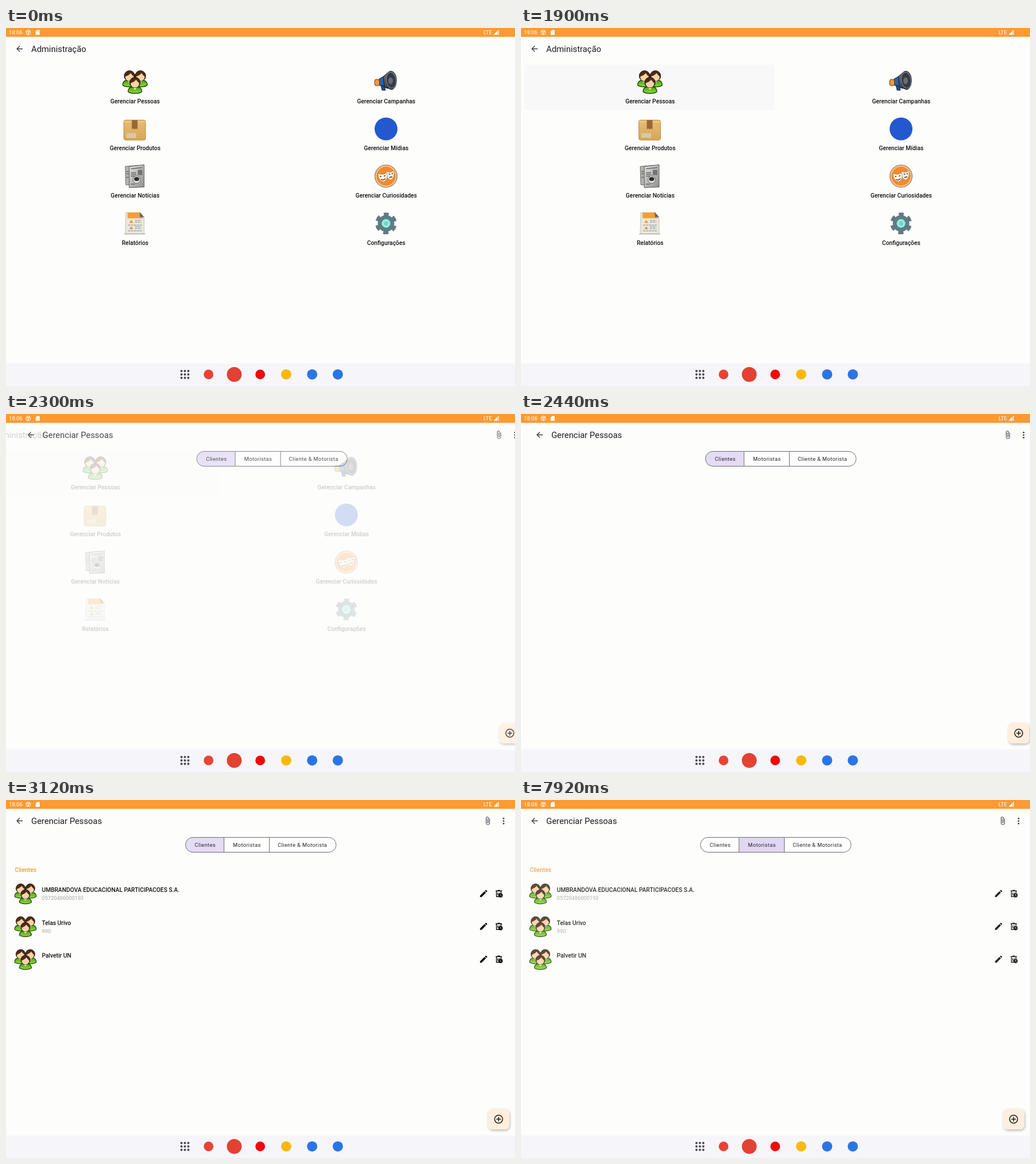
An HTML page that plays this animation: 892x627 px, repeating every 8000 ms.

```html
<!DOCTYPE html>
<html lang="pt-BR">
<head>
<meta charset="utf-8">
<title>Administração</title>
<style>
  html, body { margin: 0; width: 100%; height: 100%; overflow: hidden; background: #fdfdfc; }
  svg { display: block; }
  #stage { width: 100vw; height: 100vh; font-family: Roboto, sans-serif; }
  .title { font-size: 14.85px; fill: #1c1b1f; }
  .label { font-size: 10.3px; font-weight: 500; fill: #111; }
  .center { text-anchor: middle; }
  .tab { font-size: 9.3px; letter-spacing: .4px; fill: #29272c; }
  .sub { font-size: 9.3px; fill: #a5a5a5; }
  .status { font-size: 9.6px; fill: #fff; }

  #admin, #people, #peopleFade, #list, #listFade, #ripple, #touch, #press, #tabA, #tabB {
    animation: 8s linear infinite both;
  }
  #admin { animation-name: leave; }
  #people { animation-name: enter; }
  #peopleFade { animation-name: appear; }
  #ripple { animation-name: ripple; }
  #list { animation-name: load; }
  #listFade { animation-name: dim; }
  #touch { animation-name: touch; }
  #press { animation-name: press; }
  #tabA { animation-name: tabOff; }
  #tabB { animation-name: tabOn; }

  @keyframes leave {
    0%, 25.175% { transform: translateX(0); animation-timing-function: cubic-bezier(.3, 0, .8, .15); }
    27.53% { transform: translateX(-35.7px); animation-timing-function: cubic-bezier(.05, .7, .1, 1); }
    39.3%, 100% { transform: translateX(-89.2px); }
  }
  @keyframes enter {
    0%, 25.175% { transform: translateX(89.2px); animation-timing-function: cubic-bezier(.3, 0, .8, .15); }
    27.53% { transform: translateX(53.5px); animation-timing-function: cubic-bezier(.05, .7, .1, 1); }
    39.3%, 100% { transform: translateX(0); }
  }
  @keyframes appear { 0%, 26.75% { opacity: 0; } 29.25%, 100% { opacity: 1; } }
  @keyframes ripple { 0%, 21.7% { opacity: 0; } 23.5%, 100% { opacity: 1; } }
  @keyframes load { 0%, 31.99% { opacity: 0; } 32%, 100% { opacity: 1; } }
  @keyframes dim { 0%, 96.25% { opacity: 1; } 99%, 100% { opacity: .86; } }
  @keyframes touch { 0%, 89.99% { opacity: 0; } 90%, 93.74% { opacity: 1; } 93.75%, 100% { opacity: 0; } }
  @keyframes press { 0%, 93.74% { opacity: 0; } 95.25%, 100% { opacity: 1; } }
  @keyframes tabOff { 0%, 95.49% { opacity: 1; } 95.5%, 100% { opacity: 0; } }
  @keyframes tabOn { 0%, 95.49% { opacity: 0; } 95.5%, 100% { opacity: 1; } }
</style>
</head>
<body>
<svg id="stage" viewBox="0 0 892 627" preserveAspectRatio="none">
  <defs>
    <linearGradient id="shirt" x2="0" y2="1"><stop stop-color="#3f9a12"/><stop offset="1" stop-color="#8ee032"/></linearGradient>
    <linearGradient id="carton" x2="0" y2="1"><stop stop-color="#e6bd77"/><stop offset="1" stop-color="#d8a657"/></linearGradient>
    <linearGradient id="paper" x2="1" y2="1"><stop stop-color="#e2e2de"/><stop offset="1" stop-color="#8f908e"/></linearGradient>
    <linearGradient id="horn" x2="1" y2="1"><stop stop-color="#6b7078"/><stop offset="1" stop-color="#1d2127"/></linearGradient>
    <radialGradient id="glow"><stop stop-color="#e8fffa"/><stop offset="1" stop-color="#62c9c4"/></radialGradient>
    <filter id="shadow" x="-30%" y="-30%" width="160%" height="170%">
      <feDropShadow dx="1" dy="2" stdDeviation="2" flood-opacity=".28"/>
    </filter>

    <g id="person">
      <path d="M-12 16C-12 9 -6 6.500 0 6.500S12 9 12 16C8 20 -8 20 -12 16Z" fill="url(#shirt)" stroke="#17330a" stroke-width="1.300"/>
      <path d="M-4 8L0 13L4 8Z" fill="#f7f1e2"/>
      <ellipse rx="9.300" ry="9.300" fill="#4d2c16" stroke="#1b120b"/>
      <path d="M-7.500 1C-4 0 0 -2 2 -5C4 -2 6 0 7.500 1C7.500 6 4 9 0 9S-7.500 6 -7.500 1Z" fill="#f9d3a6"/>
    </g>
    <g id="group">
      <use href="#person" x="-9.500" y="-10"/>
      <use href="#person" x="9.500" y="-10"/>
      <use href="#person" y="1.500"/>
    </g>
    <g id="megaphone">
      <path d="M-12 -5L3 -13V12L-12 6Z" fill="#2c62ab" stroke="#17263c"/>
      <path d="M-9 6L-3 8L-1 15H-7Z" fill="#244e8b" stroke="#17263c"/>
      <rect x="-20" y="-4" width="8.500" height="11" rx="3" fill="#f09a35" stroke="#5e3b14"/>
      <path d="M-5 -9L6 -18C20 -22 23 10 10 14L-3 9Z" fill="url(#horn)" stroke="#171a1f"/>
      <ellipse cx="9" cy="-2.500" rx="8.500" ry="14" fill="#343b45" stroke="#868c93" transform="rotate(-8 9 -2.500)"/>
      <ellipse cx="8" cy="-1.500" rx="4" ry="6" fill="#656e78"/>
    </g>
    <g id="box">
      <rect x="-19.500" y="-15.500" width="38" height="35" rx="3" fill="url(#carton)" stroke="#c08c40"/>
      <path d="M-19 -12.500H18" stroke="#f3d59c"/>
      <path d="M-5.500 -15.500H4.500V1L2 -1L-.500 1L-3 -1L-5.500 1Z" fill="#9a6636"/>
      <rect x="-15" y="7.500" width="17" height="8" fill="#d9c9a6"/>
    </g>
    <g id="disc"><circle r="20" fill="#2458cf"/></g>
    <g id="news">
      <path d="M-17 -17L6 -19L8 17L-16 15Z" fill="#b5b5b0" stroke="#666762"/>
      <path d="M-10 -17L16 -20V19L-10 20Z" fill="url(#paper)" stroke="#555"/>
      <path d="M-7 -13L13 -15M-7 -6H2M-7 -3H2M-7 0H0M-7 14H0M-15 -8H-11M-15 -4H-11M-15 2H-11" stroke="#666" stroke-width="1.500"/>
      <rect x="5" y="-11" width="8" height="9" fill="#6f7576"/>
      <circle cx="3" cy="6" r="6.500" fill="#e4e4df" stroke="#666"/>
      <ellipse cx="3" cy="5" rx="4.500" ry="3.500" fill="#282d30"/>
    </g>
    <g id="masks">
      <circle r="19.500" fill="#f28b2b" stroke="#a99987" stroke-width="1.500"/>
      <circle r="17.500" fill="none" stroke="#ffd0a2" stroke-width="1.500"/>
      <path d="M0 -9Q7 -5 14 -10Q16 4 8 7Q-1 4 0 -9Z" fill="#eee9e0" stroke="#a66c36" stroke-width=".700"/>
      <path d="M-14 -5Q-6 -1 1 -6Q4 6 -4 10Q-14 8 -14 -5Z" fill="#fff" stroke="#a66c36" stroke-width=".700"/>
      <path d="M-11 0L-8 1M-4 0L-1 -1M-9 5Q-5 9 -1 4M5 -4L7 -3M10 -4L12 -5M6 3Q9 0 11 2" fill="none" stroke="#5b371c" stroke-width="1.400"/>
    </g>
    <g id="report">
      <path d="M-16 -19H9L16 -11V18H-17Z" fill="#e9e8de" stroke="#c5c2b6"/>
      <path d="M-13 -19H9L14 -13V-9H-13Z" fill="#f3a032"/>
      <path d="M8 -20L16 -11H9Z" fill="#5d6380"/>
      <path d="M-10 -1H-3L-6.500 -6ZM-10 10H-3L-6.500 5Z" fill="#ee9130"/>
      <path d="M0 -5H11M0 -2H11M0 6H11M0 9H11M-12 3H12M-12 13H12" stroke="#a2a5ab" stroke-width="1.300" stroke-dasharray="4 1"/>
      <path d="M-19 18.500H18" stroke="#b5b3aa" stroke-width="1.500"/>
    </g>
    <g id="gear">
      <circle r="16" fill="none" stroke="#607984" stroke-width="6" stroke-dasharray="9 7.755" stroke-dashoffset="4.500" transform="rotate(-90)"/>
      <circle r="12.500" fill="#78929a" stroke="#5f7a83" stroke-width="4"/>
      <circle r="9" fill="url(#glow)" stroke="#47686f" stroke-width="1.500"/>
      <circle r="5" fill="#6fd8cb" stroke="#d8fff7"/>
    </g>

    <path id="back" d="M20 11H7.830L13.420 5.410 12 4 4 12 12 20 13.410 18.590 7.830 13H20Z" fill="#39373d" transform="translate(15.500 28.300) scale(.68)"/>
    <g id="actions">
      <path d="M3 17.250V21H6.750L17.810 9.940 14.060 6.190ZM20.710 7.040A1 1 0 0 0 20.710 5.630L18.370 3.290A1 1 0 0 0 16.960 3.290L15.130 5.120 18.880 8.870Z" transform="translate(828.600 -8.400) scale(.7)"/>
      <g transform="translate(864)">
        <path d="M-6 -4.500H5M-2.500 -5.500H1.500M-4.500 -4V5.500H0M3.500 -4V0M-2 -1.500V3M.700 -1.500V0" fill="none" stroke="#000" stroke-width="1.400"/>
        <circle cx="2.700" cy="3.200" r="3.700"/>
        <path d="M2.700 1V3.400L4.300 4.300" fill="none" stroke="#fff" stroke-width=".800"/>
      </g>
    </g>
  </defs>

  <rect width="892" height="627" fill="#fdfdfc"/>

  <g id="admin">
    <rect id="ripple" x="6" y="64" width="438" height="80" fill="#f8f8f8"/>
    <use href="#back"/>
    <text class="title" x="44.300" y="41.800">Administração</text>
    <g id="menu"></g>
  </g>

  <g id="peopleFade"><g id="people">
    <rect x="-100" y="15" width="1100" height="575" fill="#fdfdfc"/>
    <use href="#back"/>
    <text class="title" x="44.300" y="41.800">Gerenciar Pessoas</text>
    <path d="M16.500 6V17.500A4 4 0 0 1 8.500 17.500V5A2.500 2.500 0 0 1 13.500 5V15.500A1 1 0 0 1 11.500 15.500V6H10V15.500A2.500 2.500 0 0 0 15 15.500V5A4 4 0 0 0 7 5V17.500A5.500 5.500 0 0 0 18 17.500V6Z" fill="#49454f" transform="translate(836.300 28.700) scale(.65)"/>
    <g fill="#39373d"><circle cx="872" cy="32.300" r="1.400"/><circle cx="872" cy="36.800" r="1.400"/><circle cx="872" cy="41.300" r="1.400"/></g>

    <path id="tabA" d="M382 65.500H327.500A13 13 0 0 0 327.500 91.500H382Z" fill="#e4dcf4"/>
    <rect id="press" x="382" y="66" width="79" height="25" fill="#eee9f7"/>
    <rect id="tabB" x="382" y="66" width="79" height="25" fill="#e0d7f3"/>
    <path d="M382 65.500V91.500M461.500 65.500V91.500" stroke="#6b6870"/>
    <rect x="314.500" y="65.500" width="264" height="26" rx="13" fill="none" stroke="#6b6870"/>
    <g class="tab">
      <text x="330.800" y="82">Clientes</text>
      <text x="397.800" y="82">Motoristas</text>
      <text x="476.200" y="82">Cliente &amp; Motorista</text>
    </g>
    <circle id="touch" cx="407" cy="74" r="7.500" fill="#fff" fill-opacity=".65" stroke="#d5d5d8"/>

    <g id="list"><g id="listFade">
      <text class="label" x="15.500" y="126.300" style="fill:#f59a35">Clientes</text>
      <g id="rows"></g>
    </g></g>

    <rect x="845" y="541" width="37" height="36" rx="8" fill="#ffeedd" filter="url(#shadow)"/>
    <g fill="none" stroke="#1d1710" stroke-width="1.500"><circle cx="863.300" cy="559" r="7"/><path d="M859.300 559H867.300M863.300 555V563"/></g>
  </g></g>

  <rect width="892" height="15.500" fill="#fc9a33"/>
  <text class="status" x="5" y="11.300">18:06</text>
  <g fill="none" stroke="#fff"><circle cx="39" cy="7.700" r="4"/><path d="M35.500 6.300H42.500M37.500 4L39 11.500L40.800 4" stroke-width=".800"/></g>
  <path d="M54.500 3.500H59V12H52V6Z" fill="#fff"/>
  <text class="status" x="836.700" y="10.800">LTE</text>
  <path d="M855 11.500L863.500 3V11.500Z" fill="#fff" fill-opacity=".45"/>
  <path d="M855 11.500L860.500 6V11.500Z" fill="#fff"/>
  <path d="M855.500 11.300L863.200 3.600V11.300Z" fill="none" stroke="#fff" stroke-width=".800"/>

  <rect y="587.500" width="892" height="40" fill="#f6f5fa"/>
  <g id="dock"></g>
</svg>
<script>
  const fill = (id, items, draw) => {
    document.getElementById(id).innerHTML = items.map(draw).join('');
  };

  const menu = [
    ['group', 'Gerenciar Pessoas'], ['megaphone', 'Gerenciar Campanhas'],
    ['box', 'Gerenciar Produtos'], ['disc', 'Gerenciar Mídias'],
    ['news', 'Gerenciar Notícias'], ['masks', 'Gerenciar Curiosidades'],
    ['report', 'Relatórios'], ['gear', 'Configurações']
  ];
  fill('menu', menu, ([icon, label], i) => {
    const x = 226 + (i % 2) * 440;
    const y = 94 + (i >> 1) * 82.75;
    return `<use href="#${icon}" x="${x}" y="${y}"/>
      <text class="label center" x="${x + .3}" y="${y + 37.6}">${label}</text>`;
  });

  const clients = [
    ['UMBRANDOVA EDUCACIONAL PARTICIPACOES S.A.', '05720486000193'],
    ['Telas Urivo', '990'],
    ['Palvetir UN', '']
  ];
  fill('rows', clients, ([name, code], i) => `<g transform="translate(0 ${163.8 + i * 57.5})">
      <use href="#group" transform="translate(34) scale(.88)"/>
      <text class="label" x="62.700" y="-2.700">${name}</text>
      <text class="sub" x="62.700" y="11.300">${code}</text>
      <use href="#actions"/></g>`);

  const apps = [
    [355, 8.5, '#ea4335'], [400, 13, '#e34133'], [445.5, 8.5, '#f00a0a'],
    [491, 9, '#f9b90b'], [536.5, 9, '#2a75e6'], [581.5, 9, '#2a75e6']
  ];
  const dots = Array.from({ length: 9 }, (_, i) =>
    [307.5 + (i % 3) * 6, 2, '#49474f', 600.7 + Math.floor(i / 3) * 6]);
  fill('dock', [...dots, ...apps], ([x, r, color, y = 606.7]) =>
    `<circle cx="${x}" cy="${y}" r="${r}" fill="${color}"/>`);
</script>
</body>
</html>
```
